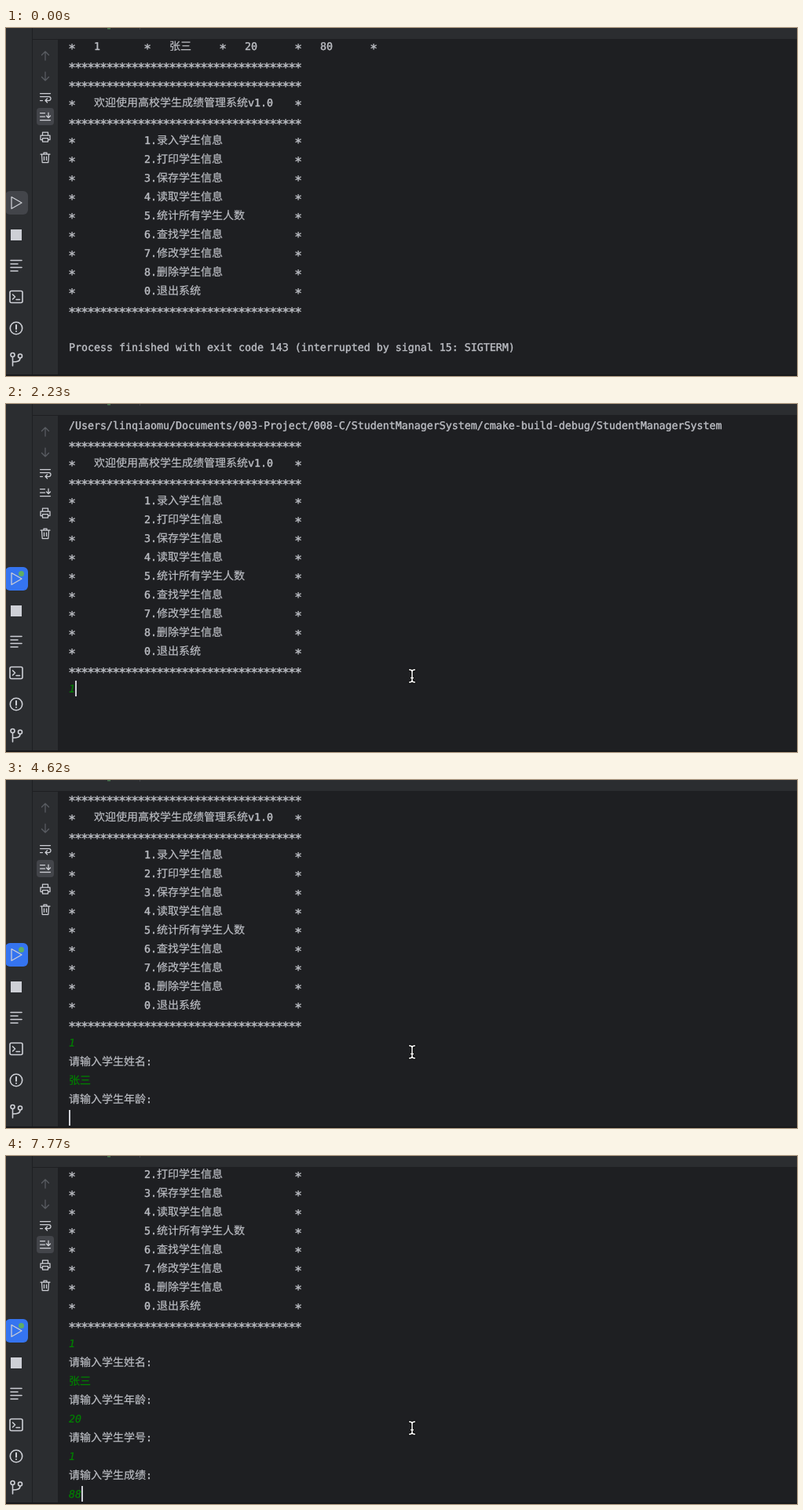
These frames come from a looping animation (1007x444 px, 8000 ms). An HTML page:

```html
<!DOCTYPE html>
<html lang="zh-CN">
<head>
<meta charset="utf-8">
<title>Console session</title>
<style>
  html, body { margin: 0; width: 100%; height: 100%; overflow: hidden; background: #1e1f22; }
  #stage { position: absolute; left: 0; top: 0; width: 1007px; height: 444px; overflow: hidden; }
  svg { display: block; }
  text {
    font: 13.29px "DejaVu Sans Mono", monospace;
    fill: #bcbec4; stroke: #bcbec4; stroke-width: .4px;
    white-space: pre; text-rendering: geometricPrecision;
  }
  .cjk { font: 14px "Noto Sans CJK SC", "Noto Sans CJK", sans-serif; stroke-width: .2px; }
  .star { font-size: 16px; letter-spacing: -1.632px; }
  .typed { fill: #008000; stroke: #008000; stroke-width: .2px; font-style: italic; }
  .line { fill: none; stroke: #ced0d6; stroke-width: 1.25; stroke-linecap: round; stroke-linejoin: round; }
  .bold { stroke-width: 1.6; }
  .dim { stroke: #5a5d63; }
  #popup {
    position: absolute; left: 80px; top: 431px; width: 442px; height: 30px; padding: 0 3px;
    display: flex; align-items: center; gap: 6px; overflow: hidden;
    background: #fff; border-radius: 8px;
    font: 15px "Noto Sans CJK SC", "Noto Sans CJK", sans-serif; color: #222;
  }
  .pick { display: flex; flex: none; align-items: center; gap: 5px; height: 24px; padding: 0 6px; border-radius: 5px; }
  .pick i { width: 7px; font: 11px "Open Sans", sans-serif; color: #999; }
  .pick:first-child, .pick:first-child i { color: #fff; }
  .pick:first-child { background: #10b073; }
  .tile { width: 16px; height: 19px; margin: 0 3px 0 2px; background: #d9cdb8; color: #c23a2b; font-size: 13px; line-height: 18px; text-align: center; }
</style>
</head>
<body>
<div id="stage">
<svg width="1007" height="444" viewBox="0 0 1007 444">
  <defs>
    <clipPath id="pane"><rect x="66" y="14" width="941" height="428"/></clipPath>
    <path id="beam" d="M-3.500-8q3.500 0 3.500 2.500q0-2.500 3.500-2.500M0-5.500v11M-3.500 8q3.500 0 3.500-2.500q0 2.500 3.500 2.500M-1.500 2.500h3"/>
  </defs>
  <rect width="1007" height="444" fill="#1e1f22"/>
  <rect width="1007" height="14" fill="#2b2d30"/>
  <rect width="66" height="444" fill="#2b2d30"/>
  <rect x="33" width="1" height="444" fill="#1e1f22"/>
  <rect x="34" y="14" width="973" height="1" fill="#1e1f22"/>
  <rect x="129" width="4" height="1.5" fill="#4b7a50"/>
  <rect x="170" width="1" height="2" fill="#43454a"/>

  <g class="line">
    <path class="dim" d="M50 41V30M45.500 34.500L50 30l4.500 4.500M50 56v11M45.500 62.500L50 67l4.500-4.500"/>
    <path d="M43.500 83.500h13M43.500 87.500h11a2.500 2.500 0 0 1 0 5h-4M52.500 90L50 92.500l2.500 2.500M43.500 92.500h3"/>
  </g>
  <rect id="follow" x="39" y="102" width="22" height="22" rx="4" fill="#43454a"/>
  <g class="line">
    <path d="M43.500 108.500h6M43.500 113h6M43.500 117.500h13M54 108v6.500M51.500 112l2.500 2.500 2.500-2.500"/>
    <path d="M46.500 137v-4h7v4M46.500 142.500h-2.500v-5.500h12v5.500h-2.500M46.500 140.500h7v4.500h-7z"/>
    <path d="M44 161h12M48 161v-2h4v2M45.500 161l.7 10.500h7.600l.7-10.500M48.500 164v4.500M51.500 164v4.500"/>
  </g>

  <rect id="runBg" x="-1" y="208" width="29" height="30" rx="6"/>
  <path class="line" d="M7 215.500L20 223L7 230.500Z"/>
  <circle id="runDot" cx="19.500" cy="216.500" r="3.500" fill="#5fad65"/>
  <rect x="6" y="257" width="14" height="14" fill="#ced0d6"/>
  <g class="line bold">
    <path d="M6 296.500h14M6 301h9M6 305.500h14M6 310h9"/>
    <rect x="5" y="335.500" width="16" height="15" rx="2"/>
    <path d="M8.500 340l3 3-3 3M13 346.500h4.500"/>
    <circle cx="13" cy="383" r="7.700"/>
    <path d="M13 379v5M13 387v.1" stroke-width="2"/>
    <circle cx="8.500" cy="417" r="2.500"/><circle cx="18" cy="418.500" r="2.500"/>
    <path d="M8.500 419.500v11.500M18 421c0 4-3 5-9.500 5"/>
  </g>

  <g clip-path="url(#pane)">
    <g id="before"></g>
    <g id="session"></g>
  </g>
  <rect y="442" width="1007" height="2" fill="#18191b"/>
  <g id="mouse" fill="none" stroke-linecap="round">
    <use href="#beam" stroke="#000" stroke-width="3.200"/>
    <use href="#beam" stroke="#fff" stroke-width="1.500"/>
  </g>
</svg>
<div id="popup"></div>
</div>
<script>
const LOOP = 8000, FRAME = 150, RUN = 890;
const NS = "http://www.w3.org/2000/svg";
const $ = id => document.getElementById(id);
const windows = [];

function node(name, attrs, parent) {
  const el = document.createElementNS(NS, name);
  for (const key in attrs) el.setAttribute(key, attrs[key]);
  return parent.appendChild(el);
}

function show(el, from, to = LOOP) {
  windows.push([el, from, to]);
  return el;
}

// y is the middle of the text row
function put(parent, x, y, str, cls = "") {
  const el = node("text", { x, y: y + 5, class: cls }, parent);
  for (const run of str.match(/[\u4e00-\u9fff]+|[^\u4e00-\u9fff]+/g)) {
    const cjk = /[\u4e00-\u9fff]/.test(run);
    node("tspan", cjk ? { class: "cjk" } : {}, el).textContent = run;
  }
  return el;
}

function stars(parent, x, y, count = 1) {
  put(parent, x - 0.8, y + 3.6, "*".repeat(count), "star");
}

function menu(parent, y) {
  const items = ["1.录入学生信息", "2.打印学生信息", "3.保存学生信息", "4.读取学生信息",
    "5.统计所有学生人数", "6.查找学生信息", "7.修改学生信息", "8.删除学生信息", "0.退出系统"];
  const row = (n, x, str) => {
    stars(parent, 80, y + n * 24);
    put(parent, x, y + n * 24, str);
    stars(parent, 368, y + n * 24);
  };
  for (const n of [0, 2, 12]) stars(parent, 80, y + n * 24, 37);
  row(1, 112, "欢迎使用高校学生成绩管理系统v1.0");
  items.forEach((item, i) => row(i + 3, 176, item));
}

const before = show($("before"), 0, RUN);
for (let x = 80; x <= 464; x += 96) stars(before, x, 23);
["1", "张三", "20", "80"].forEach((s, i) => put(before, 112 + i * 96, 23, s));
stars(before, 80, 47, 37);
menu(before, 71);
put(before, 80, 407, "Process finished with exit code 143 (interrupted by signal 15: SIGTERM)");

const session = $("session");
const rowY = n => 27 + n * 24;
put(session, 80, rowY(0), "/Users/linqiaomu/Documents/003-Project/008-C/StudentManagerSystem/cmake-build-debug/StudentManagerSystem");
menu(session, rowY(1));

const prompt = (row, what, from) => show(put(session, 80, rowY(row), `请输入学生${what}:`), from);
const typed = (row, str, from, to) => show(put(session, 80, rowY(row), str, "typed"), from, to);
typed(14, "1", 2230);
prompt(15, "姓名", 2980);
typed(16, "张三", 4330);
prompt(17, "年龄", 4620);
typed(18, "2", 5520, 5670);
typed(18, "20", 5670);
prompt(19, "学号", 6120);
typed(20, "1", 6570);
prompt(21, "成绩", 6720);
typed(22, "8", 7620, 7770);
typed(22, "88", 7770);

// time, caret x, caret row, scroll
const carets = [
  [1930, 376, 13, 0], [2080, 80, 14, 0], [2230, 88, 14, 0], [2980, 80, 16, 0],
  [4330, 107, 16, 0], [4620, 80, 18, 28], [5520, 88, 18, 28], [5670, 96, 18, 28],
  [6120, 80, 20, 76], [6570, 88, 20, 76], [6720, 80, 22, 124], [7620, 88, 22, 124], [7770, 96, 22, 124]
];
const caret = show(node("rect", { width: 2, height: 20, fill: "#ced0d6" }, session), 1930);

const picks = ["中 # 在 这 做 再 去 昨", "这 中 着 只 之 知 找 直", "炸 扎 渣 眨 诈 闸 榨 乍",
  "站 占 战 展 粘 沾 斩 盏", "张 长 章 涨 掌 丈 账 仗", "张三 掌声 长势 张 长 章 涨", "张三 张 长 章 涨 掌 丈"];
const popup = show($("popup"), 3280, 4330);
const pickHtml = picks.map(line => line.split(" ").map((word, i) =>
  `<span class="pick"><i>${i + 1}</i>${word === "#" ? '<b class="tile">中</b>' : word}</span>`).join(""));
let shownPick = -1;

show($("runDot"), RUN);
show($("mouse"), 590);

function mousePos(t) {
  if (t >= 1490) return [517, 347];
  const step = Math.floor((t - 590) / FRAME) * FRAME;
  const k = 1 - (1 - Math.min(1, Math.max(0, step / 750))) ** 2;
  return [700 - 176 * k, 4 + 332 * k];
}

function draw(t) {
  for (const [el, from, to] of windows) el.style.visibility = t >= from && t < to ? "visible" : "hidden";

  const [, x, row, scroll] = carets.findLast(c => t >= c[0]) || carets[0];
  caret.setAttribute("x", x);
  caret.setAttribute("y", rowY(row) - 10);
  session.setAttribute("transform", `translate(0 ${-scroll})`);
  session.style.display = t >= RUN ? "" : "none";

  $("mouse").setAttribute("transform", `translate(${mousePos(t)})`);
  $("runBg").setAttribute("fill", t < 1640 ? "#43454a" : "#3574f0");
  $("follow").style.visibility = t >= 1930 && t < 2980 ? "hidden" : "visible";

  const pick = Math.min(picks.length - 1, Math.max(0, Math.floor((t - 3280) / FRAME)));
  if (pick !== shownPick) popup.innerHTML = pickHtml[shownPick = pick];
}

const start = performance.now();
function tick() {
  draw((performance.now() - start) % LOOP);
  requestAnimationFrame(tick);
}
tick();
</script>
</body>
</html>
```
